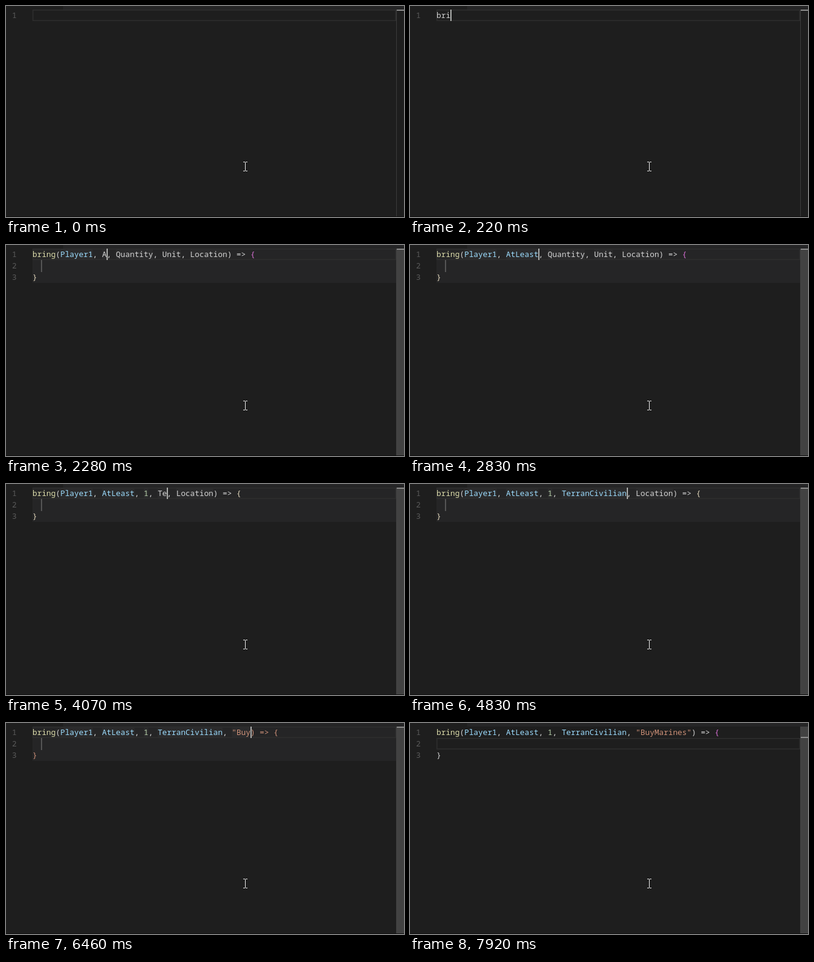
Recreate the animation shown at these times as an HTML page with a canvas. Size 661 px wide and 351 px high, loop 8 s.

```html
<!DOCTYPE html>
<html lang="en">
<head>
<meta charset="utf-8">
<title>Snippet editor</title>
<style>
html, body { margin: 0; width: 100%; height: 100%; overflow: hidden; background: #1e1e1e; }
canvas { display: block; }
</style>
</head>
<body>
<canvas id="stage" width="661" height="351"></canvas>
<script>
const ctx = document.getElementById('stage').getContext('2d');
const LOOP = 8000, LEFT = 44, TOP = 6, CHAR = 7.7, ROW = 19;
const FONT = '12.833px "Noto Sans Mono", "DejaVu Sans Mono", monospace';
const PLAIN = '#d4d4d4', STRING = '#ce9178', IDENT = '#9cdcfe';

const holders = ['Player', 'Comparison', 'Quantity', 'Unit', 'Location'];
const values = ['Player1', 'AtLeast', '1', 'TerranCivilian', '"BuyMarines"'];

const players = Array.from({ length: 12 }, (_, i) => 'Player' + (i + 1));
const matches = 'AtLeast AtMost Attack activate createUnit data format Location match rotate state update'.split(' ');
const units = 'Academy Armory Barracks Bunker Civilian Factory Firebat Ghost Marine Medic Refinery Starport'
  .split(' ').map(n => 'Terran' + n);
const ranked = [units[4], ...units.filter((_, i) => i !== 4)];

// Each step: start time, argument being edited, its text, suggestions
const steps = [[0, -1, '']];
const add = (time, arg, text, list) => steps.push([time, arg, text, list]);
const type = (times, arg, text, from, list) =>
  times.forEach((t, i) => add(t, arg, text.slice(0, from + i), list));

type([120, 170, 220, 270], -1, 'bring', 1);
add(320, -1, 'bring', ['bring']);
add(550, 0, 'Player');
type([1110, 1210, 1270], 0, 'Pla', 1);
add(1320, 0, 'Pla', players);
add(1660, 0, values[0]);
add(2000, 1, 'Comparison');
type([2280, 2390], 1, 'At', 1);
add(2450, 1, 'At', matches);
add(2730, 1, values[1]);
add(3000, 2, 'Quantity');
add(3330, 2, '1');
add(3620, 3, 'Unit');
type([3900, 4070, 4130], 3, 'Ter', 1);
type([4180, 4250, 4320, 4380], 3, 'Terran', 3, units);
type([4550, 4600, 4660], 3, 'TerranCiv', 7, ranked);
add(4830, 3, values[3]);
add(5180, 4, 'Location');
add(5690, 4, '"');
add(5730, 4, '"', matches);
type([5970, 6020], 4, '"Bu', 2, matches);
add(6070, 4, '"Buy', matches.slice(0, 7));
add(6420, 4, '"Buy');
type([6630, 6690, 6760, 6820, 6890, 6950, 7020], 4, values[4], 5);
add(7240, 4, values[4]);
add(7300, 4, values[4], matches);
add(7470, 5, '');

const blinks = [[0, 120], [830, 1110], [5520, 5690], [7920, 8000]];

function box(color, x, y, w, h) {
  ctx.fillStyle = color;
  ctx.fillRect(x, y, w, h);
}

function label(text, color, x, y) {
  ctx.fillStyle = color;
  ctx.fillText(text, x, y);
}

const colX = col => LEFT + col * CHAR;
const caretX = col => Math.round(colX(col) - 0.1);

function frame(x, y, w, h, color, line) {
  ctx.strokeStyle = color;
  ctx.lineWidth = line;
  ctx.strokeRect(x + line / 2, y + line / 2, w - line, h - line);
}

function valueColor(text) {
  if (text[0] === '"') return STRING;
  if (text === '1') return '#b5cea8';
  return values.includes(text) ? IDENT : PLAIN;
}

function drawChrome(ready, final) {
  box('#1e1e1e', 0, 0, 661, 351);
  box('#252526', 95, 0, 566, 6);
  if (ready && !final) box('#252526', LEFT, TOP, 604, 3 * ROW);
  frame(LEFT, TOP + (final ? ROW : 0), 604, ROW, '#2e2e2e', 1.5);
  if (ready) box('#424242', 648, 6, 13, 345);
  else box('#3c3c3c', 648, 6, 1, 345);
  box('#8c8c8c', 649, final ? 23 : 6, 12, 2);
  for (let i = 0; i < (ready ? 3 : 1); i++) label(i + 1, '#5a5a5a', 10, 20 + i * ROW);
}

// Draws the call on line one and returns the caret column
function drawCode(arg, text) {
  const open = arg === 4 && text[0] === '"' && text !== values[4];
  let col = 0, caret = 0;
  const put = (word, color) => {
    label(word, color, colX(col), 20);
    col += word.length;
  };
  put('bring', '#dcdcaa');
  put('(', PLAIN);
  holders.forEach((holder, i) => {
    const word = i < arg ? values[i] : i === arg ? text : holder;
    const selected = i === arg && word === holder;
    if (arg < 5) box(selected ? '#264f78' : '#2b2b2c', colX(col), TOP + 1, word.length * CHAR, ROW - 2);
    put(word, valueColor(word));
    if (i === arg) caret = col;
    if (i < 4) put(', ', PLAIN);
  });
  put(') => ', open ? STRING : PLAIN);
  put('{', open ? STRING : arg === 1 || arg === 5 ? '#da70d6' : '#e4d9bd');
  label('}', open ? STRING : arg === 5 ? PLAIN : '#e4d9bd', LEFT, 58);
  if (arg < 5) box('#555555', 58, 25, 2, 20);
  return caret;
}

function drawList(list, col, arg, text) {
  const x = Math.min(Math.round(colX(col)), 204), y = 25;
  const h = arg < 0 ? 264 : list.length * ROW + 2;
  box('#252526', x, y, 440, h);
  frame(x, y, 440, h, '#454545', 1);
  box('#062f4a', x + 1, y + 1, 438, ROW);
  list.forEach((item, i) => {
    const base = y + 15 + i * ROW;
    frame(x + 6, base - 9, 9, 9, '#75beff', 1);
    label(item, PLAIN, x + 22, base);
    if (item.startsWith(text)) label(text, '#0097fb', x + 22, base);
  });
  if (arg < 0) {
    label('bring(' + holders.join(', ') + ') => {', PLAIN, x + 8, y + 39);
    label('}', PLAIN, x + 8, y + 39 + 2 * ROW);
  }
}

function drawPointer() {
  box('#f0f0f0', 397, 260, 1, 14);
  for (const y of [259, 274]) {
    box('#f0f0f0', 394, y, 3, 1);
    box('#f0f0f0', 398, y, 3, 1);
  }
}

function draw(time) {
  const [, arg, text, list] = steps.findLast(s => s[0] <= time);
  const final = arg === 5;
  ctx.font = FONT;
  drawChrome(arg >= 0, final);
  let caret = text.length;
  if (arg < 0) label(text, PLAIN, LEFT, 20);
  else caret = drawCode(arg, text);
  if (!blinks.some(([a, b]) => time >= a && time < b)) {
    box('#aeafad', caretX(final ? 2 : caret), final ? 25 : TOP, 2, ROW);
  }
  if (list) drawList(list, caret, arg, text);
  drawPointer();
  box('#101010', 0, 350, 661, 1);
}

const start = performance.now();
function tick() {
  draw((performance.now() - start) % LOOP);
  requestAnimationFrame(tick);
}
tick();
</script>
</body>
</html>
```
